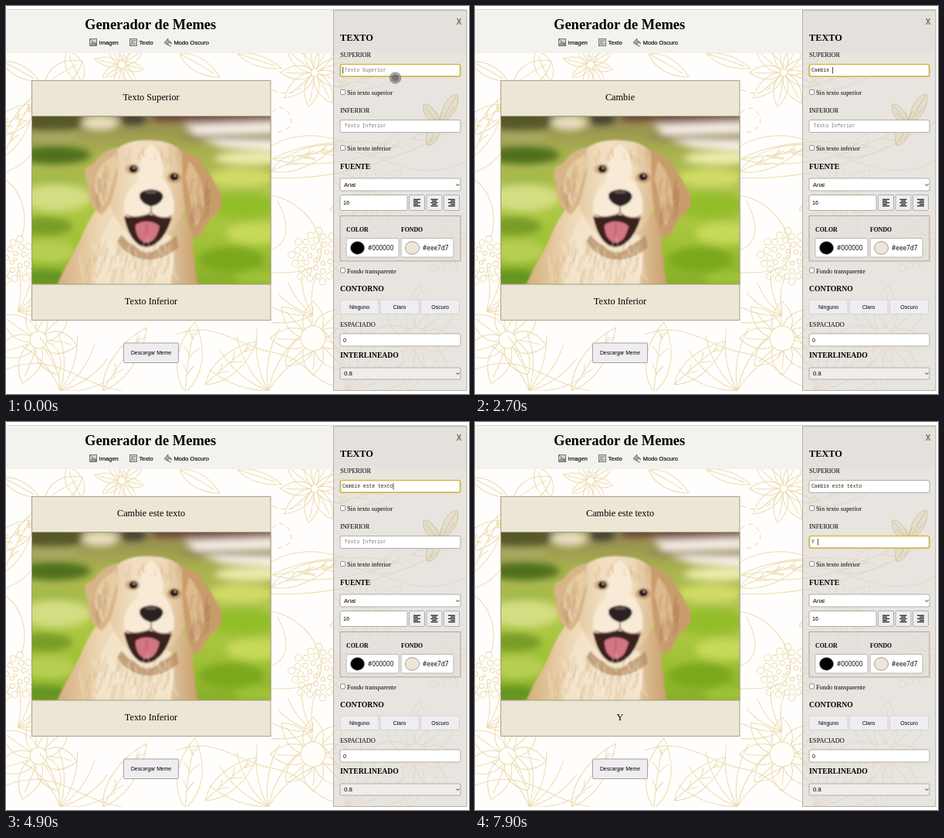
Animation of 600 by 502 pixels, one loop 8 s. Source, as an HTML page:

```html
<!DOCTYPE html>
<html lang="es">
<head>
<meta charset="utf-8">
<title>Generador de Memes</title>
<style>
html, body { margin: 0; width: 100%; height: 100%; overflow: hidden; background: #fff; }
svg { display: block; width: 600px; height: 502px; }
text { white-space: pre; }
.serif { font-family: "Liberation Serif", serif; }
.sans { font-family: "Liberation Sans", sans-serif; }
.mono { font-family: "Liberation Mono", monospace; }
.hex { font-family: "Open Sans", sans-serif; }
.menu { stroke: #333; stroke-width: .22; }
.line { fill: none; stroke: #ecdcb0; stroke-width: 1.05; }
</style>
</head>
<body>
<svg id="stage" viewBox="0 0 600 502"></svg>
<script>
let seed = 11;
const rnd = (a, b) => a + (b - a) * ((seed = seed * 16807 % 2147483647) / 2147483647);

// ---------- drawing helpers ----------
const rect = (x, y, w, h, fill, stroke = 'none', r = 0, extra = '') =>
  `<rect x="${x}" y="${y}" width="${w}" height="${h}" rx="${r}" fill="${fill}" stroke="${stroke}" ${extra}/>`;
const path = (d, fill = 'none', extra = '') => `<path d="${d}" fill="${fill}" ${extra}/>`;
const oval = (x, y, rx, ry, fill, extra = '') =>
  `<ellipse cx="${x}" cy="${y}" rx="${rx}" ry="${ry}" fill="${fill}" ${extra}/>`;
const text = (x, y, str, size, cls = 'serif', extra = '') =>
  `<text x="${x}" y="${y}" font-size="${size}" class="${cls}" ${extra}>${str}</text>`;
const bold = 'font-weight="700"', mid = 'text-anchor="middle"';
const range = (n, f) => Array.from({ length: n }, (_, i) => f(i)).join('');

// ---------- floral wallpaper ----------
function leaf(x, y, angle, len, w, veins = 3) {
  let d = `M0 0C${len * .25} ${-w} ${len * .65} ${-w} ${len} 0C${len * .65} ${w} ${len * .25} ${w} 0 0M0 0Q${len / 2} ${-w * .15} ${len * .85} 0`;
  for (let i = 1; i <= veins; i++) {
    const p = i / (veins + 1), s = w * .5 * Math.sin(Math.PI * p);
    d += `M${len * p} 0q${len * .08} ${-s * .3} ${len * .14} ${-s}M${len * p} 0q${len * .08} ${s * .3} ${len * .14} ${s}`;
  }
  return `<g transform="translate(${x} ${y}) rotate(${angle})">${path(d)}</g>`;
}
const flower = (x, y, n, len, w, turn = 0, core = 5) =>
  range(n, i => leaf(x, y, turn + i * 360 / n, len * rnd(.85, 1.1), w, 0)) + oval(x, y, core, core, '#fffefa');
const bubbles = (x, y, n, size) => range(n, i => {
  const r = size * Math.sqrt(i / n), a = i * 2.4, c = 2 + 2.6 * r / size;
  return oval(x + r * Math.cos(a), y + r * Math.sin(a), c, c, 'none');
});
// fan of long curved strands
const fan = (x, y, from, to, n, len, bend) => path(range(n, i => {
  const a = (from + (to - from) * i / (n - 1)) * Math.PI / 180, c = Math.cos(a), s = Math.sin(a);
  return `M${x} ${y}q${len * .5 * c - bend * s} ${len * .5 * s + bend * c} ${len * c} ${len * s}`;
}));

const wallpaper = `<g class="line" clip-path="url(#page)">` +
  leaf(50, 102, -32, 58, 18, 0) + leaf(98, 98, -115, 45, 15, 0) + leaf(-5, 72, 28, 55, 10, 0) +
  flower(150, 76, 8, 34, 8, 12) + flower(400, 86, 9, 50, 12, 20) +
  leaf(-20, 165, -30, 75, 19) + leaf(-5, 196, -62, 92, 15) +
  leaf(300, 62, 18, 60, 9, 0) + leaf(225, 62, 30, 60, 12, 0) +
  path('M345 138q12-14 24 4q5 20-22 22M345 108q15 8 30 2q18-8 22-28', 'none', 'stroke-dasharray="7 4"') +
  leaf(343, 214, -22, 92, 15) + leaf(345, 198, -6, 165, 17, 4) +
  path('M0 215Q25 205 33 190M340 222Q460 230 597 150M343 182Q395 150 470 190T597 200') +
  path('M0 225C20 240 30 270 20 300M343 245C375 250 402 275 408 310S380 345 343 345M352 252C372 292 362 308 343 316') +
  bubbles(12, 328, 28, 30) + bubbles(405, 325, 40, 36) + bubbles(565, 310, 28, 32) +
  fan(15, 395, -90, 5, 6, 58, 8) + fan(398, 400, 170, 275, 6, 54, -8) +
  flower(42, 432, 7, 58, 19, 8, 11) + flower(398, 430, 8, 56, 18, 0, 16) +
  fan(70, 498, -130, -15, 7, 75, 13) + fan(340, 498, -160, -40, 7, 82, -14) +
  leaf(125, 498, -55, 100, 18) + leaf(232, 500, -82, 92, 21) + leaf(258, 490, -40, 88, 17) +
  path('M0 470C65 445 95 490 150 498M220 425C270 405 300 440 345 448S390 480 425 492') +
  flower(470, 250, 7, 52, 16, 10) + leaf(430, 105, -15, 100, 17) + leaf(470, 195, -22, 120, 18) +
  flower(530, 430, 8, 66, 19, 5, 14) + fan(440, 498, -110, -10, 7, 85, 15) + `</g>`;

const butterfly = `<g fill="none" stroke="#d3c08c" stroke-width=".9">` +
  path('M563 149C563 131 574 115 585 114C588 126 581 144 565 151Z', '#d8c48c33') +
  path('M561 149C556 134 549 126 541 127C539 140 548 151 560 152Z', '#d8c48c33') +
  path('M565 152C577 147 586 152 583 160C577 167 568 161 564 155Z', '#d8c48c33') +
  path('M560 153C548 155 542 164 546 180C556 181 563 168 562 156Z', '#d8c48c33') +
  path('M564 149L583 117M565 150L582 130M560 150L543 130M560 151L545 138M566 154L581 156M560 155L549 176') +
  oval(562, 153, 1.3, 8, '#d3c08c') + path('M562 145q-3-7-6-9M563 145q1-6 4-9') + '</g>';

// ---------- photo ----------
const strands = (n, x0, x1, y0, y1, dx, dy, color) => path(range(n, () =>
  `M${rnd(x0, x1)} ${rnd(y0, y1)}q${rnd(-4, 4)} ${dy / 2} ${dx} ${dy}`), 'none',
  `stroke="${color}" stroke-width="1.3" stroke-linecap="round" opacity=".38"`);

const meadow = rect(25, 135, 326, 232, 'url(#grass)') + `<g filter="url(#far)">` +
  oval(60, 148, 45, 15, '#56592c') + oval(122, 151, 24, 10, '#e6dcbd') + oval(62, 169, 34, 7, '#a9ab62') +
  rect(190, 134, 160, 15, '#6c4538') + oval(165, 146, 18, 8, '#453f30') +
  path('M232 155L350 151V164L246 167ZM250 172L350 174V188L282 183Z', '#faf3ec') +
  path('M225 150L350 145V151L235 155Z', '#b39a88') + path('M215 167L350 166V172L240 173Z', '#8c7a50') +
  oval(62, 193, 48, 12, '#50701d') + oval(62, 222, 44, 9, '#a5b948') + oval(318, 197, 48, 8, '#eeeeb0') +
  oval(305, 222, 42, 12, '#cfdc66') + oval(65, 248, 45, 17, '#d4dd83') + oval(50, 285, 36, 12, '#789c27') +
  oval(305, 258, 46, 18, '#94bd2c') + oval(325, 294, 40, 14, '#c7d95a') + oval(292, 328, 42, 16, '#7aa71d') +
  oval(55, 318, 36, 14, '#b8cf52') + oval(48, 352, 34, 11, '#649420') + oval(332, 352, 36, 9, '#9fc336') + '</g>';

const dog = `<g filter="url(#near)">` +
  path('M66 362C75 338 88 322 99 296C108 274 120 256 134 250L235 272C245 296 240 318 249 362Z', 'url(#coat)') +
  path('M112 362C120 328 121 292 140 270L213 297C224 322 213 350 214 362Z', '#f3e3c9') +
  path('M150 296C163 316 195 322 221 296L224 312C196 337 160 332 144 304Z', '#b58e62', 'opacity=".75"') +
  // head and ears
  path('M130 205C137 182 161 171 190 174C220 174 235 190 242 215C246 243 230 275 213 290C194 306 169 306 153 289C135 269 123 233 130 205Z', 'url(#head)') +
  path('M144 183C127 186 120 196 113 205C101 207 99 217 106 229C105 250 112 264 124 270C137 260 140 240 145 216Z', '#d8b588') +
  path('M228 187C251 193 261 211 271 231C281 244 283 261 273 268C260 275 257 295 246 301C235 290 232 263 229 235Z', '#c99c6c') +
  path('M143 192C120 203 114 219 116 242L127 260C136 243 138 223 145 207Z', '#e7cba3') +
  path('M237 200C253 219 260 243 254 270L247 285C239 266 240 241 232 224Z', '#ddb98c') +
  // face
  path('M188 178C201 190 207 207 202 222C215 236 222 255 215 274C197 286 172 283 154 270C150 254 156 238 171 226C168 207 174 190 188 178Z', '#f8ead4') +
  oval(164, 211, 10, 7, '#c09a6d', 'opacity=".55"') + oval(218, 222, 10, 7, '#b98d60', 'opacity=".6"') +
  path('M153 272C165 276 178 269 187 270C198 271 207 277 215 273C210 291 199 311 182 312C166 311 157 292 153 272Z', '#3a201b') +
  path('M168 283C177 276 193 278 199 285C196 299 190 307 180 306C172 303 167 294 168 283Z', '#d27682') +
  path('M183 281L181 297', 'none', 'stroke="#a9505f" stroke-width="1.1"') +
  path('M163 304C172 316 192 316 202 301L198 313C187 323 171 320 163 304Z', '#f3e1c8') +
  path('M188 256V267Q174 278 155 270M188 267Q201 279 215 271', 'none', 'stroke="#6b483a" stroke-width="1.3"') +
  path('M173 244C176 236 199 235 203 244C206 251 195 259 188 259C180 258 172 251 173 244Z', '#2c2320') +
  oval(188, 241, 8, 1.6, '#6a5c55') +
  oval(165, 211, 5.6, 4.8, '#26150f') + oval(218, 221, 5.6, 4.8, '#26150f') +
  oval(166, 209.5, 1.1, .9, '#eee') + oval(219, 219.5, 1.1, .9, '#eee') +
  strands(40, 105, 212, 302, 345, -5, 20, '#b98f5f') + strands(40, 95, 225, 300, 345, 4, 17, '#fffaf0') +
  strands(16, 108, 134, 202, 245, 2, 18, '#a2774c') + strands(18, 242, 267, 220, 263, -2, 20, '#8f6039') +
  strands(18, 152, 228, 183, 200, 2, 9, '#bf9767') + '</g>';

// ---------- panel parts ----------
const field = (y, h = 16, w = 156) => rect(433, y, w, h, '#fff', '#aaa6a0', 2, 'stroke-width=".9"');
const chevron = y => path(`M583.5 ${y}l2 2 2-2`, 'none', 'stroke="#222" stroke-width="1"');
const check = (y, label) => rect(433.5, y - 6.5, 6, 6, '#fff', '#777', 1, 'stroke-width=".8"') + text(442, y, label, 8.3);
const aligned = (x, offset) => rect(x, 244.5, 20, 20, '#efeef0', '#aaa8a5', 1.5, 'stroke-width=".9"') +
  range(5, i => {
    const w = i % 2 ? 6 : 9;
    return rect(x + 5.5 + (9 - w) * offset, 249.7 + i * 2.1, w, 1.2, '#111');
  });
const swatch = (x, color) => rect(x, 300.5, 68, 24.5, '#fff', '#b5afa5', 2, 'stroke-width=".9"') +
  oval(x + 14.5, 313, 9, 8.3, color, 'stroke="#77746c" stroke-width=".7"') + text(x + 28, 316, color, 8.2, 'hex');
const outline = (x, label) => rect(x, 380, 50, 18.5, '#eeedf0', '#cfccd0', 1, 'stroke-width=".8"') +
  text(x + 25, 391.7, label, 7, 'sans', mid);

const panel = rect(424.5, 5.5, 172.5, 492, '#ddd8d3', 'none', 0, 'opacity=".67"') +
  rect(424.5, 5.5, 172.5, 492, 'none', '#b5aea2') + butterfly +
  text(587, 24, 'X', 10, 'sans', `${bold} ${mid} fill="#756c58"`) +
  text(433, 45, 'TEXTO', 12.3, 'serif', bold) +
  text(433, 66, 'SUPERIOR', 8.3) + field(75.5) + check(115, 'Sin texto superior') +
  text(433, 138, 'INFERIOR', 8.3) + field(147.5) + check(187, 'Sin texto inferior') +
  text(433, 211, 'FUENTE', 9.7, 'serif', bold) + field(223) + text(438, 234, 'Arial', 7.5, 'sans') + chevron(230.5) +
  field(244.5, 20, 87) + text(437, 257.2, '16', 7.2, 'sans') +
  aligned(522.5, 0) + aligned(545, .5) + aligned(567.5, 1) +
  rect(433, 271.5, 156, 58.5, '#e3dfda', '#aaa08e', 0, 'fill-opacity=".5" stroke-width=".9"') +
  text(441, 291.5, 'COLOR', 7.8, 'serif', bold) + text(512, 291.5, 'FONDO', 7.8, 'serif', bold) +
  swatch(441, '#000000') + swatch(512, '#eee7d7') +
  check(345.5, 'Fondo transparente') + text(433, 369, 'CONTORNO', 9.7, 'serif', bold) +
  outline(433, 'Ninguno') + outline(485, 'Claro') + outline(537.5, 'Oscuro') +
  text(433, 415, 'ESPACIADO', 8.3) + field(424) + text(437, 434.7, '0', 7.2, 'sans') +
  text(433, 455, 'INTERLINEADO', 9.7, 'serif', bold) +
  rect(433, 468, 156, 15, '#efedea', '#aaa6a0', 1, 'stroke-width=".9"') + text(438, 478.4, '0.8', 7.9, 'sans') + chevron(474.5);

const icons = `<g fill="none" stroke="#777" stroke-width="1">` +
  rect(108.5, 42.5, 9, 9, '#d5d3d0', '#777') + path('M109 51l3.5-5 2 2.5 1.3-1.5 2 4M108.5 42.5l9 9', '#999') +
  rect(160.5, 42.5, 9, 9, '#d8d6d3', '#777') + path('M162 45h6M162 47h3M161 51l3-3 2 2 2-2') +
  path('M205 47.5l5-5.5v3.2q4 0 5 3.8q-2-1.6-5-1.4v3zM209 49q1 3 5 3', '#aaa') + '</g>';

const header = rect(0, 4, 597, 1, '#d9d7d4') + rect(0, 5, 597, 56, '#f4f2ee') +
  text(102, 30, 'Generador de Memes', 18.5, 'serif', bold) + icons +
  text(120.5, 49.7, 'Imagen', 7.6, 'sans menu') + text(172.5, 49.7, 'Texto', 7.6, 'sans menu') +
  text(217.5, 49.7, 'Modo Oscuro', 7.6, 'sans menu');

const meme = rect(33.5, 96.5, 309.5, 310, '#ebe6d6', '#aaa184') +
  `<g clip-path="url(#photo)">${meadow}${dog}</g>` + rect(33.5, 142.5, 309.5, 217.5, 'none', '#a39b7c') +
  text(188, 122.3, '', 12.3, 'serif', mid + ' id="upper"') + text(188, 385.5, '', 12.3, 'serif', mid + ' id="lower"') +
  rect(152.5, 436, 71, 25.5, '#efedf0', '#a5a2a4', 1) + text(188, 451.2, 'Descargar Meme', 6.8, 'sans', mid);

const live = rect(433.5, 75.5, 155, 15.5, 'none', '#dcb840', 2, 'id="ring" stroke-width="1.5"') +
  text(436, 85.3, '', 6.4, 'mono', 'id="top"') + text(436, 157.3, '', 6.4, 'mono', 'id="bottom"') +
  rect(436, 79, .8, 8.5, '#222', 'none', 0, 'id="caret"') +
  `<g id="halo">${oval(0, 0, 7.8, 7.8, '#777', 'opacity=".65"')}${oval(0, 0, 4.5, 4.5, '#555', 'opacity=".55"')}</g>`;

const blur = (id, s) => `<filter id="${id}" x="-10%" y="-10%" width="120%" height="120%"><feGaussianBlur stdDeviation="${s}"/></filter>`;
const stops = colors => colors.map((c, i) => `<stop offset="${i / (colors.length - 1)}" stop-color="${c}"/>`).join('');
const $ = id => document.getElementById(id);

$('stage').innerHTML = `<defs>${blur('far', 5)}${blur('near', 1)}
  <linearGradient id="grass" x2="0" y2="1">${stops(['#8f8250', '#aab350', '#b3c94c', '#a0c135', '#83ad28'])}</linearGradient>
  <linearGradient id="coat">${stops(['#d6ae7c', '#efdab8', '#eedbbb', '#c99f6d'])}</linearGradient>
  <linearGradient id="head">${stops(['#e2c79f', '#f2dfc2', '#eed8b8', '#d3ad7f'])}</linearGradient>
  <clipPath id="photo">${rect(33.5, 142.5, 309.5, 217.5)}</clipPath>
  <clipPath id="page">${rect(0, 61, 597, 437)}</clipPath></defs>` +
  rect(0, 0, 600, 502, '#fff') + rect(0, 61, 597, 437, '#fffefc') + wallpaper + header + meme + panel + live;

// ---------- motion ----------
const LOOP = 8000, LAG = 140, SWITCH = 5500, CHAR = 3.84;
const typing = {
  top: { str: 'Cambie este texto', hint: 'Texto Superior', y: 0, start: 0,
    keys: [1000, 1500, 1900, 2250, 2380, 2510, 2640, 2760, 2880, 3000, 3110, 3220, 3900, 4080, 4250, 4430, 4600] },
  bottom: { str: 'Y ', hint: 'Texto Inferior', y: 72, start: SWITCH, keys: [7350, 7650] }
};
const clicks = [{ at: 0, x: 504.5, y: 93 }, { at: SWITCH, x: 484, y: 161.5 }];
const typed = (f, t) => f.str.slice(0, f.keys.filter(k => k <= t).length);

function showField(id, memeId, t) {
  const f = typing[id], value = typed(f, t), box = $(id);
  box.textContent = value || f.hint;
  box.setAttribute('x', value ? 436 : 438.8);
  box.setAttribute('fill', value ? '#222' : '#777');
  $(memeId).textContent = typed(f, t - LAG).trim() || f.hint;
}

function draw(t) {
  showField('top', 'upper', t);
  showField('bottom', 'lower', t);

  const focus = t < SWITCH ? typing.top : typing.bottom;
  const last = Math.max(focus.start, ...focus.keys.filter(k => k <= t));
  $('ring').setAttribute('y', 75.5 + focus.y);
  $('caret').setAttribute('y', 79 + focus.y);
  $('caret').setAttribute('x', 436.3 + CHAR * typed(focus, t).length);
  $('caret').setAttribute('opacity', Math.floor((t - last) / 530) % 2 ? 0 : 1);

  const click = clicks[t < SWITCH ? 0 : 1];
  $('halo').setAttribute('transform', `translate(${click.x} ${click.y})`);
  $('halo').setAttribute('opacity', Math.max(0, Math.min(1, (click.at + 600 - t) / 250)));
}

function tick() {
  draw(performance.now() % LOOP);
  requestAnimationFrame(tick);
}
tick();
</script>
</body>
</html>
```
